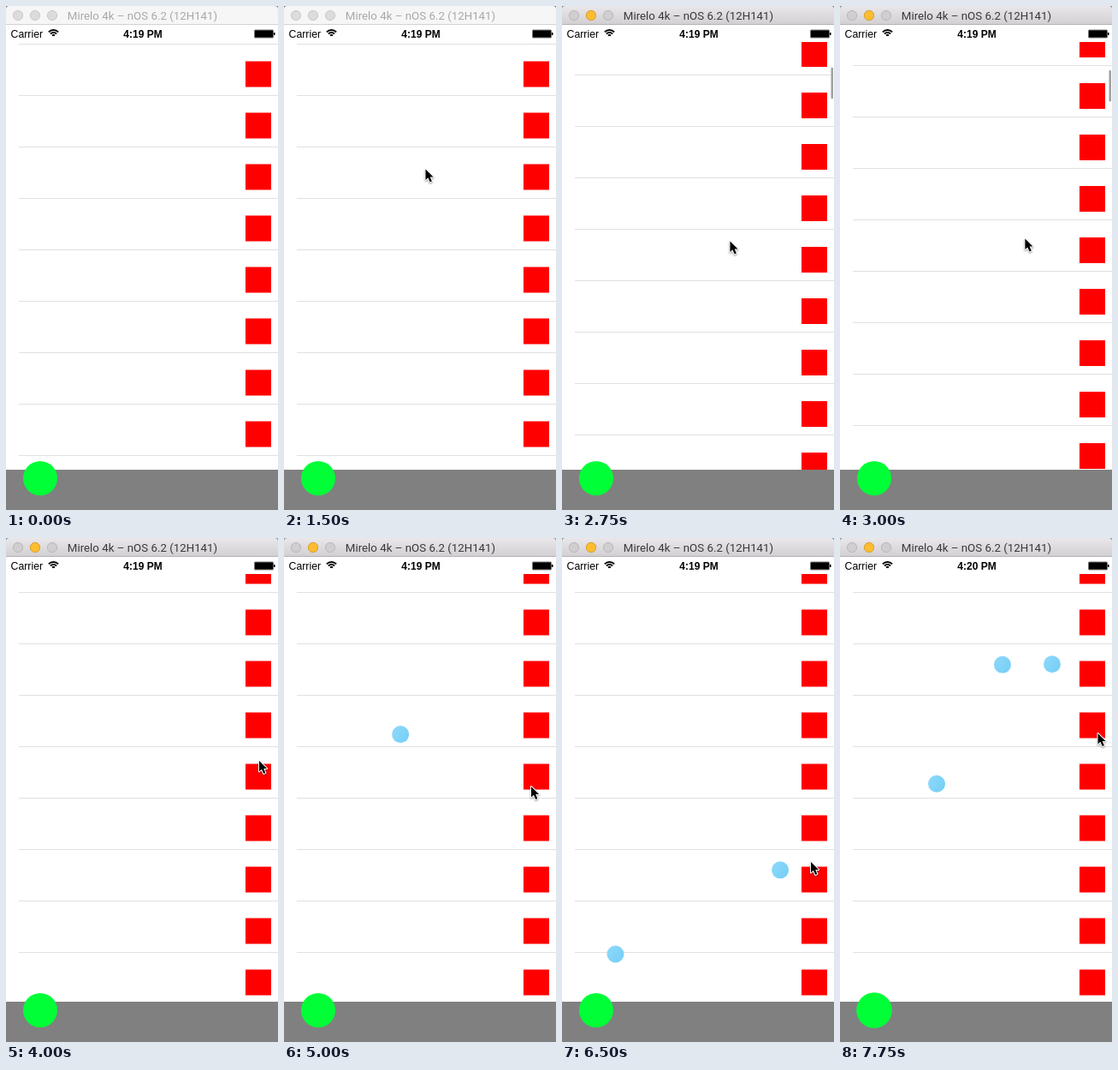
Animation, 318 px wide and 588 px high, one loop 8 s. Source, as an HTML page with a canvas:

```html
<!DOCTYPE html>
<html lang="en">
<head>
<meta charset="utf-8">
<style>
  html, body { margin: 0; width: 100%; height: 100%; overflow: hidden; background: #fff; }
  canvas { display: block; }
</style>
</head>
<body>
<canvas id="stage" width="318" height="588"></canvas>
<script>
const ctx = document.getElementById('stage').getContext('2d');
const LOOP = 8000, STEP = 250;
const POINTER_AT = 1000, SCROLL_AT = 2250, SCROLL_TIME = 1000, BAR_HIDDEN_AT = 3750, CLOCK_AT = 7000;
const FLIGHT = 1100, PULSE = 340, RISE = 268;
const ROW = 60, CART = { x: 40, y: 551 }, SQUARE = { x: 295, y: 38.5 };
const SANS = '"Liberation Sans", Arial, sans-serif';
const ARROW = new Path2D('M.5 .5V13l2.9-2.7 2.3 5.2 2.2-1-2.2-5 3.9-.1z');

// Pointer stops as [time, x, y]; taps as [time, row].
const STOPS = [
  [1000, 302, 462], [1500, 165, 190], [2250, 184.5, 284.5], [2750, 196, 274],
  [4000, 295.5, 259.5], [5000, 288.5, 289.5], [6250, 290, 454], [6500, 290.5, 377.5], [7750, 301, 227.5]
];
const TAPS = [[4300, 3], [5492, 6], [6319, 7], [6952, 3], [7281, 3], [7537, 3]];

const clamp = u => Math.min(1, Math.max(0, u));
const mix = (a, b, u) => a + (b - a) * u;
const bezier = (a, b, c, u) => mix(mix(a, b, u), mix(b, c, u), u);

// The list is pulled down a little, then glides up and slows to a stop on half points.
function scrollOffset(t) {
  if (t < SCROLL_AT) return 0;
  const left = 1 - clamp((t - SCROLL_AT) / SCROLL_TIME);
  return Math.round(2 * mix(-41, 7, left ** 1.45)) / 2;
}

function pointerAt(t) {
  const i = Math.max(1, STOPS.findIndex(stop => stop[0] >= t));
  const [t0, x0, y0] = STOPS[i - 1], [t1, x1, y1] = STOPS[i];
  const u = clamp((t - t0) / (t1 - t0));
  return [mix(x0, x1, u), mix(y0, y1, u)];
}

function rect(x, y, w, h, fill) {
  ctx.fillStyle = fill;
  ctx.fillRect(x, y, w, h);
}

function roundRect(x, y, w, h, r, fill) {
  ctx.beginPath();
  ctx.roundRect(x, y, w, h, r);
  ctx.fillStyle = fill;
  ctx.fill();
}

function disc(x, y, r, fill, stroke) {
  ctx.beginPath();
  ctx.arc(x, y, r, 0, Math.PI * 2);
  ctx.fillStyle = fill;
  ctx.fill();
  if (!stroke) return;
  ctx.strokeStyle = stroke;
  ctx.lineWidth = 1;
  ctx.stroke();
}

function gradient(x0, y0, x1, y1, from, to) {
  const shade = ctx.createLinearGradient(x0, y0, x1, y1);
  shade.addColorStop(0, from);
  shade.addColorStop(1, to);
  return shade;
}

function label(text, x, y, font, color, align) {
  ctx.font = font;
  ctx.fillStyle = color;
  ctx.textAlign = align;
  ctx.fillText(text, x, y);
}

function drawTitleBar(active) {
  rect(0, 0, 318, 22, '#8c8c8c');
  roundRect(0, 0, 318, 22, [4, 4, 0, 0], active ? gradient(0, 0, 0, 21, '#e9e7e9', '#d2d0d2') : '#f6f6f6');
  rect(0, 21, 318, 1, active ? '#b4b2b4' : '#d1d1d1');
  const [fill, edge] = active ? ['#d0ced0', '#b9b7b9'] : ['#dcdcdc', '#c8c8c8'];
  for (const x of [14, 34, 54]) disc(x, 11, 5.6, fill, edge);
  if (active) disc(34, 11, 5.6, '#fdbd31', '#dfa12b');
  label('Mirelo 4k – nOS 6.2 (12H141)', 159.5, 16, '13.3px Roboto, sans-serif', active ? '#3a383a' : '#a8a8a8', 'center');
}

function drawStatusBar(t) {
  rect(0, 22, 318, 20, '#fff');
  label('Carrier', 5.5, 37, '12.3px ' + SANS, '#000', 'left');
  label(t < CLOCK_AT ? '4:19 PM' : '4:20 PM', 160, 37, 'bold 12px ' + SANS, '#000', 'center');
  ctx.strokeStyle = '#000';
  ctx.lineWidth = 1.9;
  for (const r of [8, 5, 2]) {
    ctx.beginPath();
    ctx.arc(55.5, 36, r, -Math.PI * 0.75, -Math.PI * 0.25);
    ctx.stroke();
  }
  roundRect(290, 27.5, 23, 10, 1.5, '#777');
  roundRect(291, 28.5, 21, 8, 0.5, '#000');
  rect(313, 31, 1.5, 3, '#000');
}

function drawList(t) {
  const offset = scrollOffset(t);
  ctx.save();
  ctx.beginPath();
  ctx.rect(0, 42, 318, 499);
  ctx.clip();
  for (let y = 44 + offset; y < 541; y += ROW) {
    rect(15, Math.floor(y), 303, 1, '#e0e0e0');
    rect(280, y + 20.5, 30, 30, '#f00');
  }
  if (t >= SCROLL_AT && t < BAR_HIDDEN_AT) roundRect(314.5, 65 - offset * 0.29, 2.5, 36.5, 1.25, '#a0a0a0');
  ctx.restore();
}

// The cart swells briefly each time a ball lands.
function drawCart(t) {
  let r = 20;
  for (const [start] of TAPS) r += 9.5 * Math.sin(Math.PI * clamp((t - start - FLIGHT) / PULSE));
  disc(CART.x, CART.y, r, '#00ff37');
}

function drawBall(t, [start, row]) {
  const u = (t - start) / FLIGHT;
  if (u < 0 || u > 1) return;
  const startY = SQUARE.y + row * ROW;
  const x = bezier(SQUARE.x, 175, CART.x, u);
  const y = bezier(startY, startY - RISE, CART.y, u);
  disc(x, y, 10, gradient(x - 8, y - 6, x + 8, y + 6, '#8ad8fa', '#78cff6'));
}

function drawPointer(t) {
  ctx.save();
  ctx.translate(...pointerAt(t));
  ctx.lineJoin = 'round';
  ctx.strokeStyle = '#fff';
  ctx.lineWidth = 2;
  ctx.shadowColor = 'rgba(0,0,0,.4)';
  ctx.shadowBlur = 2;
  ctx.shadowOffsetY = 1;
  ctx.stroke(ARROW);
  ctx.shadowColor = 'transparent';
  ctx.fillStyle = '#000';
  ctx.fill(ARROW);
  ctx.restore();
}

function draw(t) {
  rect(0, 0, 318, 588, '#fff');
  drawList(t);
  rect(0, 541, 318, 47, '#808080');
  drawTitleBar(t >= SCROLL_AT);
  drawStatusBar(t);
  drawCart(t);
  for (const tap of TAPS) drawBall(t, tap);
  if (t >= POINTER_AT) drawPointer(t);
}

const began = performance.now();
function tick() {
  const t = (performance.now() - began) % LOOP;
  draw(Math.floor(t / STEP) * STEP);
  requestAnimationFrame(tick);
}
tick();
</script>
</body>
</html>
```
